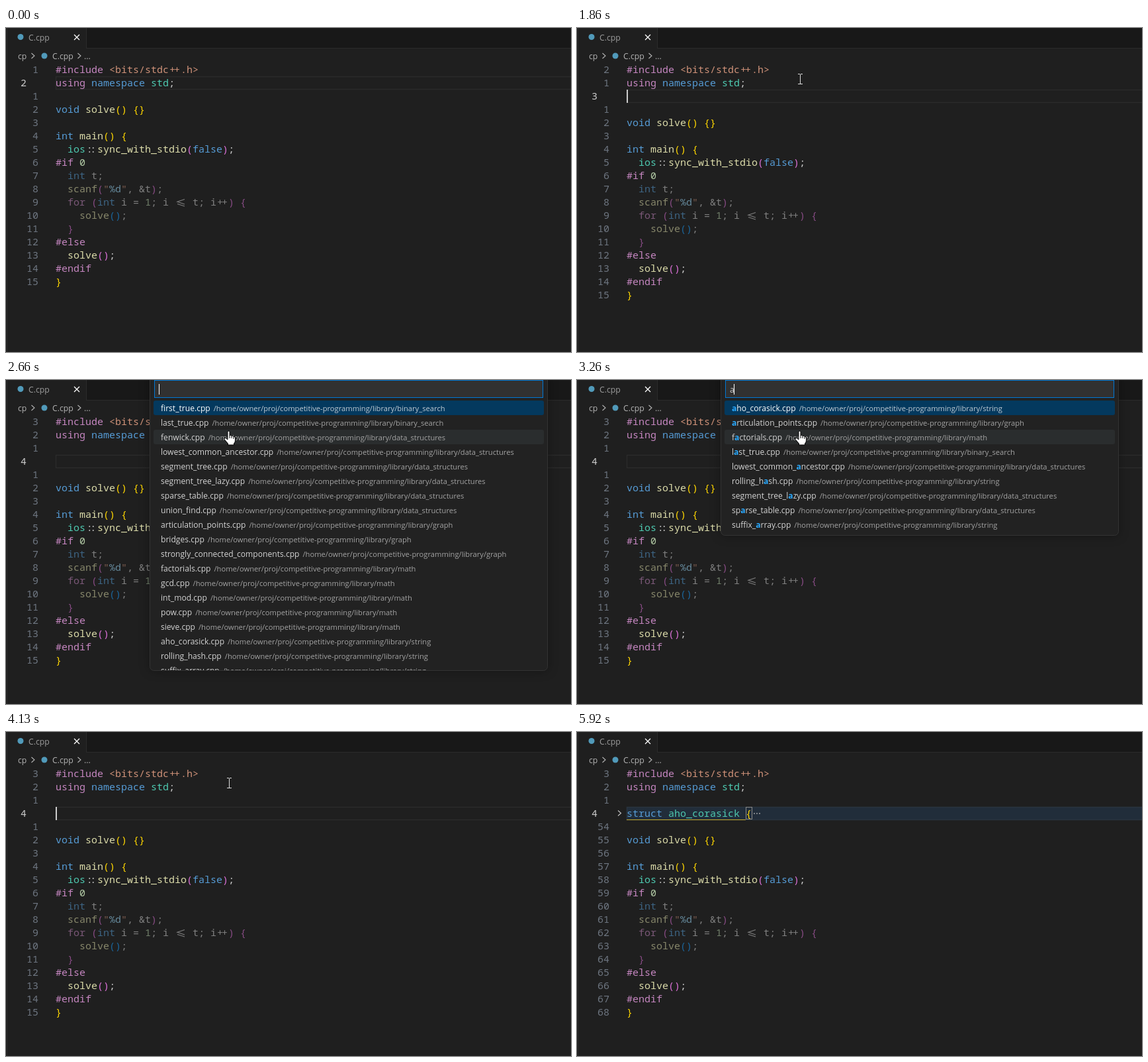
Write an HTML page with a canvas that moves like this. It is 854x489 px and loops after 6450 ms.

```html
<!DOCTYPE html>
<html lang="en">
<head>
<meta charset="utf-8">
<title>Snippet insertion</title>
<style>
html, body { margin: 0; height: 100%; overflow: hidden; background: #1f1f1f; }
canvas { display: block; }
</style>
</head>
<body>
<canvas id="stage" width="854" height="489"></canvas>
<script>
const ctx = document.getElementById('stage').getContext('2d');
const LOOP = 6450, CELL = 9, ROW = 20, CODE_X = 75;
const MONO = '500 15px "Noto Sans Mono", monospace';
const ui = (size, weight = 400) => `${weight} ${size}px "Open Sans", sans-serif`;

// Each token starts with the key of its colour; tokens are separated by "|".
const COLORS = {
  p: '#c586c0', s: '#ce9178', k: '#569cd6', t: '#4ec9b0', f: '#dcdcaa', w: '#cccccc',
  y: '#ffd700', o: '#da70d6', b: '#179fff', n: '#b5cea8', v: '#9cdcfe'
};
const HEAD = ['p#include |s<bits/stdc++.h>', 'pusing |knamespace |tstd|w;'];
const STRUCT = 'kstruct |taho_corasick |y{';
// A leading "~" marks an inactive line.
const BODY = [
  '', 'kvoid |fsolve|y() {}', '', 'kint |fmain|y() {',
  't  ios|w::|fsync_with_stdio|o(|kfalse|o)|w;',
  'p#if |n0', '~k  int |wt;', '~f  scanf|o(|s"|v%d|s"|w, &t|o)|w;',
  '~p  for |o(|kint |wi = |n1|w; i <= t; i++|o) {',
  '~f    solve|b()|w;', '~o  }',
  'p#else', 'f  solve|o()|w;', 'p#endif', 'y}'
];

const FILES = Object.entries({
  binary_search: 'first_true last_true',
  data_structures: 'fenwick lowest_common_ancestor segment_tree segment_tree_lazy sparse_table union_find',
  graph: 'articulation_points bridges strongly_connected_components',
  math: 'factorials gcd int_mod pow sieve',
  string: 'aho_corasick rolling_hash suffix_array'
}).flatMap(([dir, names]) => names.split(' ').map(name => ({
  name, path: '/home/owner/proj/competitive-programming/library/' + dir
})));

// Pointer way points: time, x, y
const POINTER = [
  [460, 478, 330], [720, 343, 80], [1470, 337, 77], [5320, 337, 77], [5590, 660, 330]
];

function rect(x, y, w, h, color) {
  ctx.fillStyle = color;
  ctx.fillRect(x, y, w, h);
}

function roundRect(x, y, w, h, r, fill, border) {
  ctx.beginPath();
  ctx.roundRect(x, y, w, h, r);
  ctx.fillStyle = fill;
  ctx.fill();
  if (border) {
    ctx.shadowColor = 'transparent';
    ctx.lineWidth = 1;
    ctx.strokeStyle = border;
    ctx.stroke();
  }
}

function line(points, color, width = 1) {
  ctx.beginPath();
  points.forEach(([x, y]) => ctx.lineTo(x, y));
  ctx.strokeStyle = color;
  ctx.lineWidth = width;
  ctx.stroke();
}

// Draws text and returns the x where it ends.
function text(str, x, y, color, font) {
  ctx.font = font;
  ctx.fillStyle = color;
  ctx.fillText(str, x, y);
  return x + ctx.measureText(str).width;
}

function dot(x, y, r, color) {
  ctx.beginPath();
  ctx.arc(x, y, r, 0, 7);
  ctx.fillStyle = color;
  ctx.fill();
}

const chevron = (x, y, color) => line([[x - 2, y - 4], [x + 2.5, y], [x - 2, y + 4]], color, 1.1);

function drawChrome() {
  rect(0, 0, 854, 489, '#1f1f1f');
  rect(0, 0, 1, 489, '#181818');
  rect(122, 0, 732, 30, '#181818');
  rect(121, 0, 1, 31, '#2b2b2b');
  rect(121, 30, 733, 1, '#2b2b2b');
  rect(1, 0, 1, 489, '#2b2b2b');
  dot(22, 13.5, 4.5, '#519aba');
  text('C.cpp', 34, 19, '#9d9d9d', ui(12.2));
  line([[103, 10], [111, 18]], '#fff', 1.3);
  line([[111, 10], [103, 18]], '#fff', 1.3);
  text('cp', 18, 47, '#b4b4b4', ui(12.2));
  chevron(40.5, 42, '#b4b4b4');
  dot(58, 42, 4.5, '#519aba');
  text('C.cpp', 70, 47, '#b4b4b4', ui(12.2));
  chevron(110.5, 42, '#b4b4b4');
  text('...', 118, 47, '#b4b4b4', ui(12.2));
}

function drawCode(source, baseline) {
  ctx.globalAlpha = source[0] === '~' ? 0.55 : 1;
  const cells = source.replace('~', '').split('|')
    .flatMap(token => [...token.slice(1)].map(ch => [ch, COLORS[token[0]]]));
  cells.forEach(([ch, color], i) => {
    const x = CODE_X + i * CELL, y = baseline;
    const before = cells[i - 1]?.[0], after = cells[i + 1]?.[0];
    if (ch === '<' && after === '=') {
      line([[x + 15, y - 9.5], [x + 4, y - 5.7], [x + 15, y - 2]], color, 1.2);
      line([[x + 4, y - 2.5], [x + 15, y + 1]], color, 1.2);
    } else if (ch !== ' ' && !(ch === '=' && before === '<')) {
      // Double signs move together like a ligature.
      const pull = ch === ':' ? 1.7 : ch === '+' ? 1 : 0;
      const dx = ch === after ? pull : ch === before ? -pull : 0;
      text(ch, x + dx, y, color, MONO);
    }
  });
  ctx.globalAlpha = 1;
}

function drawEditor(t) {
  const extra = t < 1860 ? 0 : t < 2330 ? 1 : 2;
  const folded = t >= 4400;
  const current = 1 + extra;
  const lines = [...HEAD, ...Array(extra).fill(''), ...BODY];
  if (folded) lines[current] = STRUCT;

  const top = 53 + current * ROW;
  if (folded) rect(CODE_X, top, 779, ROW, '#212d3a');
  ctx.strokeStyle = folded ? '#29343f' : '#2b2b2b';
  ctx.lineWidth = 1.5;
  ctx.strokeRect(CODE_X + 0.5, top + 0.5, 790, ROW - 1);

  lines.forEach((source, i) => {
    const y = 68 + i * ROW;
    drawCode(source, y);
    if (i === current) {
      text(String(i + 1), 22, y, '#cccccc', MONO);
    } else {
      const number = String(Math.abs(i - current) + (folded && i > current ? 53 : 0));
      text(number, 49 - number.length * CELL, y, '#6e7681', MONO);
    }
  });

  if (folded) {
    chevron(64, top + 9.5, '#c5c5c5');
    rect(CODE_X, top + 19, 180, 1, '#c0a62c');
    for (let i = 0; i < 3; i++) rect(267 + i * 4, top + 9, 2, 2, '#7d8287');
    if (t >= 4920) {
      ctx.strokeStyle = '#888';
      ctx.lineWidth = 1;
      ctx.strokeRect(255.5, top + 0.5, 9, ROW - 2);
    }
  }

  const within = (from, to) => t >= from && t < to;
  const caretOn = within(950, 1470) || within(1660, 2590) || within(4070, 4920) || within(5420, 5920);
  const caretX = folded ? 263 : extra ? CODE_X : 255;
  if (caretOn) rect(caretX, top, 2, ROW, '#cccccc');
}

function drawFile(file, query, y, selected) {
  const label = file.name + '.cpp';
  const at = label.indexOf(query), end = at + query.length;
  const color = selected ? '#ffffff' : '#d4d4d4';
  let x = text(label.slice(0, at), 234, y, color, ui(12.1));
  x = text(label.slice(at, end), x, y, '#2aaaff', ui(12.1, 700));
  x = text(label.slice(end), x, y, color, ui(12.1));
  text(file.path, x + 5, y, selected ? '#c0cbd4' : '#a3a3a3', ui(11.18));
}

function drawPicker(t) {
  const typed = t < 3190 ? '' : t < 3320 ? 'a' : t < 3870 ? 'ah' : 'aho';
  // The list follows the typed text a moment later.
  const query = t < 3260 ? '' : t < 3390 ? 'a' : typed;
  const files = FILES.filter(file => file.name.includes(query));
  if (query) files.sort((a, b) => a.name < b.name ? -1 : 1);
  const bottom = Math.min(438, 36 + files.length * 22);

  ctx.save();
  ctx.shadowColor = 'rgba(0,0,0,.36)';
  ctx.shadowBlur = 16;
  roundRect(217.5, -10.5, 601, bottom + 11, 6, '#222222', '#333333');
  ctx.restore();
  rect(224, 0, 588, 27, '#313131');
  ctx.strokeStyle = '#0078d4';
  ctx.lineWidth = 1;
  ctx.strokeRect(224.5, 0.5, 587, 26);
  const end = text(typed, 231, 19, '#cccccc', ui(12.1));
  rect(Math.floor(end), 6, 1, 16, '#ffffff');

  ctx.save();
  ctx.beginPath();
  ctx.rect(218, 30, 600, bottom - 30);
  ctx.clip();
  files.forEach((file, i) => {
    const y = 31 + i * 22;
    const hovered = i === 2 && t >= 2660;
    if (i === 0 || hovered) roundRect(223, y, 590, 22, 3, i ? '#2a2d2e' : '#04395e');
    drawFile(file, query, y + 16, i === 0);
  });
  ctx.restore();
}

function pointerAt(t) {
  const next = POINTER.findIndex(([time]) => time > t);
  if (next < 0) return POINTER.at(-1).slice(1);
  const [t0, x0, y0] = POINTER[next - 1], [t1, x1, y1] = POINTER[next];
  const p = (t - t0) / (t1 - t0), eased = p * (2 - p);
  return [x0 + (x1 - x0) * eased, y0 + (y1 - y0) * eased];
}

const HAND = new Path2D(`M-2 1.5 Q-2 0 -.5 0 Q1 0 1 1.5 V7 Q3 5.5 4 7.5 Q6 6.5 7 8.5
  Q9.5 8 9.5 10.5 V14 Q9.5 17 7.5 19 V21 H-1.5 V19 L-7 12.5 Q-7.5 10 -5 10.5 L-2 13 Z`);

function drawPointer(t) {
  const [x, y] = pointerAt(t);
  ctx.save();
  ctx.translate(Math.round(x), Math.round(y));
  if (t >= 2660 && t < 3390) {
    ctx.fillStyle = '#fff';
    ctx.strokeStyle = '#000';
    ctx.lineWidth = 1;
    ctx.fill(HAND);
    ctx.stroke(HAND);
    line([[1, 7], [1, 11]], '#000');
    line([[4, 7.5], [4, 11]], '#000');
    line([[7, 8.5], [7, 12]], '#000');
  } else {
    rect(0, -7, 1, 15, '#dddddd');
    for (const end of [-8, 7]) {
      rect(-3, end, 3, 1, '#dddddd');
      rect(1, end, 3, 1, '#dddddd');
    }
  }
  ctx.restore();
}

function render(now) {
  const t = now % LOOP;
  drawChrome();
  drawEditor(t);
  if (t >= 2590 && t < 4070) drawPicker(t);
  if (t >= 460 && t < 5920) drawPointer(t);
}

const start = performance.now();
function tick() {
  render(performance.now() - start);
  requestAnimationFrame(tick);
}
tick();
</script>
</body>
</html>
```
